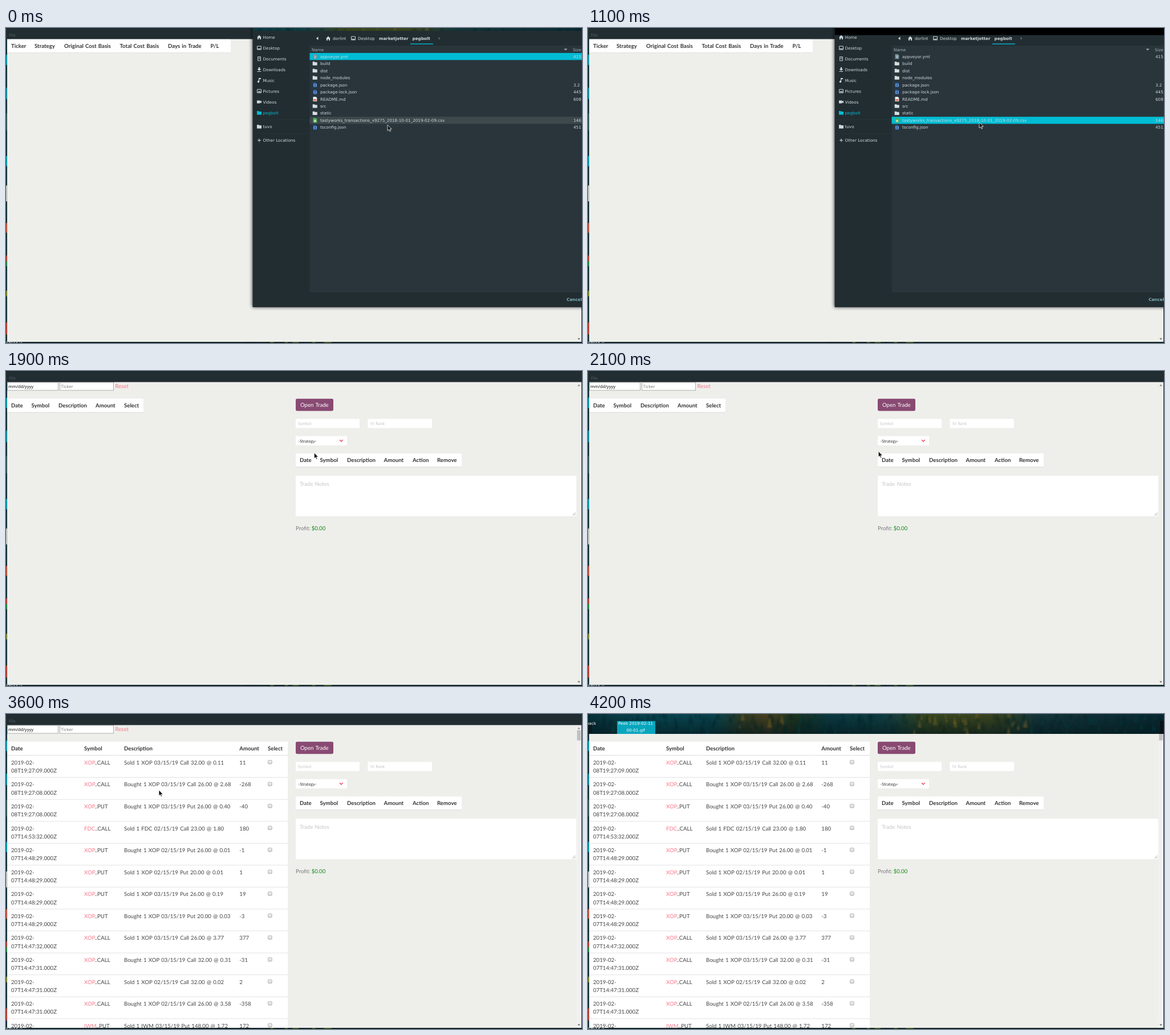
An HTML page for the animation above (4.3 s loop, 1010 px wide and 554 px high).

```html
<!DOCTYPE html>
<html lang="en">
<head>
<meta charset="utf-8">
<title>Trade import</title>
<style>
html, body { margin: 0; width: 100%; height: 100%; overflow: hidden; background: #eeefeb; }
svg { display: block; width: 1010px; height: 554px; }
text { white-space: pre; text-rendering: geometricPrecision; }
.web { font: 9.65px Lato, sans-serif; word-spacing: .75px; fill: #444; }
.head { font-weight: 700; fill: #333; }
.small { font-size: 7.3px; }
.field { font: 7.5px "Noto Sans", sans-serif; }
.ui { font: 7.2px "DejaVu Sans", sans-serif; fill: #cfd8dc; }
.bold { font-weight: 700; }
</style>
</head>
<body>
<svg id="stage" viewBox="0 0 1010 554" xmlns="http://www.w3.org/2000/svg"></svg>
<script>
const LOOP = 4300, STEP = 100;
const CYAN = '#00bcd4', PINK = '#f5798d', PALE = '#c4c6c8';

const rect = (x, y, w, h, fill, more = '') =>
  `<rect x="${x}" y="${y}" width="${w}" height="${h}" fill="${fill}" ${more}/>`;
const path = (d, fill, more = '') => `<path d="${d}" fill="${fill}" ${more}/>`;
const text = (x, y, s, cls, fill) =>
  `<text x="${x}" y="${y}" class="${cls}"${fill ? ` style="fill:${fill}"` : ''}>${s}</text>`;
const at = (x, y, body) => `<g transform="translate(${x} ${y})">${body}</g>`;
const group = (id, body) => `<g id="${id}">${body}</g>`;
const heads = (y, cols) => cols.map(([x, s]) => text(x, y, s, 'web head')).join('');

function seeded(seed) {
  return () => (seed = (seed * 16807) % 2147483647) / 2147483647;
}

const gradient = (id, axis, stops) => `<linearGradient id="${id}" ${axis}>${
  stops.map(([o, c]) => `<stop offset="${o}" stop-color="${c}"/>`).join('')}</linearGradient>`;
const down = 'x2="0" y2="1"';

const defs = `<defs>
  ${gradient('woods', '', [[0, '#08323b'], [.1, '#094652'], [.22, '#0a4650'], [.27, '#2f3a22'], [.31, '#4a4120'],
    [.36, '#1c341f'], [.42, '#0b3a42'], [.52, '#123f42'], [.59, '#37461f'], [.7, '#3b4520'], [.78, '#15363a'], [1, '#092a33']])}
  ${gradient('dusk', down, [[0, '#04181c00'], [1, '#04181caa']])}
  ${gradient('box', down, [[0, '#f2f2f2'], [1, '#d8d8d8']])}
  <filter id="shadow" x="-5%" y="-5%" width="110%" height="110%"><feGaussianBlur stdDeviation="3"/></filter>
  <filter id="soft"><feGaussianBlur stdDeviation="1"/></filter>
  <clipPath id="sky"><rect width="1010" height="35"/></clipPath>
  <clipPath id="sliver"><rect x="433" width="577" height="5"/></clipPath>
  <clipPath id="view"><rect x="2" y="19" width="1007" height="533"/></clipPath>
</defs>`;

function woods() {
  const rnd = seeded(77);
  let trees = '';
  for (let i = 0; i < 320; i++) {
    const x = rnd() * 1010, y = rnd() * 38, r = 2 + rnd() * 5;
    const warm = (x > 265 && x < 345) || (x > 560 && x < 770);
    const tones = warm ? ['#14261a', '#0d2320', '#7a6426'] : ['#062127', '#0c3c40', '#08292f'];
    trees += path(`M${x} ${y - r * 1.5}l${r * .6} ${r * 2.6}h${-r * 1.2}z`, tones[i % 3], 'opacity=".45"');
  }
  return `<g clip-path="url(#sky)">${rect(0, 0, 1010, 35, 'url(#woods)')}${rect(0, 0, 1010, 35, 'url(#dusk)')}` +
    `<g filter="url(#soft)">${trees}</g></g>`;
}

// Slivers of the desktop that show around the window.
function edges() {
  const side = [[47, 18, '#08a6bd'], [105, 20, '#0a94ab'], [150, 30, '#31585a'], [225, 18, '#08a6bd'],
    [277, 28, '#d5d5d0'], [343, 17, '#d8553a'], [400, 10, '#c8402f'], [410, 9, '#1f8a4c'],
    [462, 10, '#7c8a2c'], [518, 21, '#d23c30']];
  const rnd = seeded(5);
  let s = rect(0, 0, 2, 554, '#0e2c33') + rect(0, 552, 1010, 2, '#0d2325') + rect(1009, 0, 1, 554, '#14272c');
  s += side.map(([y, h, c]) => rect(0, y, 1.7, h, c)).join('');
  for (let i = 0; i < 16; i++) s += rect(420 + rnd() * 150, 552, 3 + rnd() * 9, 2, i % 2 ? '#34511f' : '#0a1c20');
  return s + text(0, 555, 'ywork.g', 'ui');
}

const scrollArrows = path('M1002 26.5l2.5-3 2.5 3z', '#8d8d8d') + path('M1002 545.5l2.5 3 2.5-3z', '#777');
const titleBar = rect(0, 0, 1010, 19.5, '#222d32') + rect(0, 0, 1010, 1, '#10272d') +
  text(5, 14.6, 'File', 'ui', '#4f5b60');

const emptyList = rect(2, 19.5, 392, 23.5, '#fff') + rect(2, 43, 392, 1, '#e1e1e1') +
  heads(34.6, [[9, 'Ticker'], [50, 'Strategy'], [102, 'Original Cost Basis'],
    [199.5, 'Total Cost Basis'], [284, 'Days in Trade'], [358.5, 'P/L']]);

function tradeForm() {
  const border = 'stroke="#9b9b9b" stroke-width=".8"';
  return rect(2.4, 20, 89.2, 14, '#fff', border) + text(4, 30, 'mm/dd/yyyy', 'field', '#111') +
    rect(94.4, 20, 94.2, 14, '#fff', border) + text(96.5, 30, 'Ticker', 'field', '#7a7a7a') +
    text(191.5, 30.2, 'Reset', 'web', PINK) +
    rect(508, 48.7, 66, 21.5, '#884a72', 'rx="2.4"') + text(516, 62.6, 'Open Trade', 'web', '#fff') +
    rect(508, 84.3, 112, 16, '#fff', 'rx="1"') + text(512, 95.1, 'Symbol', 'web small', PALE) +
    rect(634.5, 84.3, 112.3, 16, '#fff', 'rx="1"') + text(639, 95.1, 'IV Rank', 'web small', PALE) +
    rect(508, 114.6, 90, 16.2, '#fff', 'rx="1"') + text(512.5, 125.5, '-Strategy-', 'web small', '#333') +
    path('M585 121l2.9 2.9 2.9-2.9', 'none', 'stroke="#ee4f6c" stroke-width="1.5"') +
    rect(508, 145, 291, 23.5, '#fff') + rect(508, 168.3, 291, 1, '#dedede') +
    heads(160, [[515, 'Date'], [550.5, 'Symbol'], [598, 'Description'], [662.5, 'Amount'], [713, 'Action'], [756, 'Remove']]) +
    rect(508, 184, 492, 71.3, '#fff', 'rx="1"') + text(515, 201.8, 'Trade Notes', 'web', PALE) +
    path('M993.5 254l5-5M996.5 254l2-2', 'none', 'stroke="#777" stroke-width=".7"') +
    text(508, 280, 'Profit:', 'web', '#777') + text(535.7, 280, '$0.00', 'web', '#128a12');
}

const noTrades = rect(2, 48.5, 239, 24, '#fff') + rect(2, 72.3, 239, 1, '#dedede') +
  heads(64, [[9, 'Date'], [44.5, 'Symbol'], [92, 'Description'], [157, 'Amount'], [207, 'Select']]);

const TRADES = [
  '08T19:27:09 XOP Call Sold 03/15/19 32.00 0.11',
  '08T19:27:08 XOP Call Bought 03/15/19 26.00 2.68',
  '08T19:27:08 XOP Put Bought 03/15/19 26.00 0.40',
  '07T14:53:32 FDC Call Sold 02/15/19 23.00 1.80',
  '07T14:48:29 XOP Put Bought 02/15/19 26.00 0.01',
  '07T14:48:29 XOP Put Sold 02/15/19 20.00 0.01',
  '07T14:48:29 XOP Put Sold 03/15/19 26.00 0.19',
  '07T14:48:29 XOP Put Bought 03/15/19 20.00 0.03',
  '07T14:47:32 XOP Call Sold 03/15/19 26.00 3.77',
  '07T14:47:31 XOP Call Bought 03/15/19 32.00 0.31',
  '07T14:47:31 XOP Call Sold 02/15/19 32.00 0.02',
  '07T14:47:31 XOP Call Bought 02/15/19 26.00 3.58',
  '07T14:45:10 IWM Put Sold 03/15/19 148.00 1.72'
];

function tradeRow(line, i) {
  const [time, symbol, kind, side, expiry, strike, price] = line.split(' ');
  const amount = Math.round(price * 100) * (side === 'Sold' ? 1 : -1);
  const y = 88.8 + i * 38.57;
  return text(9, y, '2019-02-', 'web') + text(9, y + 14.4, `${time}.000Z`, 'web') +
    text(137, y, `<tspan fill="${PINK}">${symbol}</tspan>..${kind.toUpperCase()}`, 'web') +
    text(207, y, `${side} 1 ${symbol} ${expiry} ${kind} ${strike} @ ${price}`, 'web') +
    text(409.3, y, amount, 'web') +
    rect(459.6, y - 7.4, 6.6, 6.4, 'url(#box)', 'rx="1.3" stroke="#a3a3a3" stroke-width=".8"') +
    rect(2, y + 22.4, 492, .8, '#dcdcdc');
}

const trades = rect(2, 48.5, 492, 504, '#fff') + rect(2, 72.3, 492, .9, '#d8d8d8') +
  heads(64, [[9, 'Date'], [137, 'Symbol'], [207, 'Description'], [409.3, 'Amount'], [459, 'Select']]) +
  TRADES.map(tradeRow).join('') +
  rect(1000.5, 19, 8.5, 533, '#f1f1f1') + rect(1001.3, 28.5, 6.7, 18, '#c1c1c1') + scrollArrows;

const line = 'fill="none" stroke="currentColor"';
const ICON = {
  home: '<path d="M0 4.5L4 .5l4 4H7V8H5V5.5H3V8H1V4.5z"/>',
  desk: `<path d="M.6 1h6.8v6H.6z" ${line}/><path d="M1.5 5h5v1.4h-5z"/>`,
  page: `<path d="M1.5.5h5v7h-5zM2.8 2.6h2.6M2.8 4.2h2.6" ${line} stroke-width=".9"/>`,
  down: '<path d="M2.8 0h2.4v3H7.4L4 6.2.6 3h2.2zM.6 7h6.8v1H.6z"/>',
  note: '<path d="M3 0h4v2H4.2v4.4a1.7 1.7 0 1 1-1.2-1.6z"/>',
  photo: `<path d="M.6 1h6.8v6H.6z" ${line}/><path d="M1.4 6l2-2.6L4.7 5l.8-1L7 6z"/>`,
  film: '<path d="M0 1.6h5.5v1.7L8 1.8v4.4L5.5 4.7v1.7H0z"/>',
  folder: '<path d="M0 1h3.2l1 1H8v5.4H0z"/>',
  plus: '<path d="M3.5 1h1v2.5H7v1H4.5V7h-1V4.5H1v-1h2.5z"/>'
};
const icon = (name, x, y, color) => at(x, y, `<g fill="${color}" color="${color}">${ICON[name]}</g>`);

const PLACES = [['home', 'Home', 16], ['desk', 'Desktop', 35], ['page', 'Documents', 54], ['down', 'Downloads', 73],
  ['note', 'Music', 92], ['photo', 'Pictures', 111], ['film', 'Videos', 130], ['folder', 'pegbolt', 149],
  ['folder', 'tuvo', 173.3], ['plus', 'Other Locations', 197.5]];

const FILES = ['appveyor.yml|415', 'build|', 'dist|', 'node_modules|', 'package.json|3.2', 'package-lock.json|445',
  'README.md|608', 'src|', 'static|', 'tastyworks_transactions_x9275_2018-10-01_2019-02-09.csv|146', 'tsconfig.json|451'];
const CSV = 9;
const rowY = i => 50.1 + i * 12.47;

function fileIcon(name, y) {
  const sheet = (color, mark) => at(538.5, y - 4, path('M0 0h4.8l2 2v6.2H0z', color) + mark);
  const ext = name.split('.')[1];
  if (ext === 'json') return sheet('#1d57a5', path('M2.6 2q-1 0-.8 1.2T1 4.6q1 .2.8 1.3t.8 1.2M4.4 2q1 0 .8 1.2T6 4.6q-1 .2-.8 1.3t-.8 1.2', 'none', 'stroke="#fff" stroke-width=".7"'));
  if (ext === 'md') return sheet('#eceff1', rect(1, 4.4, 4.8, 2.6, '#d9623f'));
  if (ext === 'csv') return sheet('#4caf50', rect(1.4, 3.4, 4, 3.4, '#d8f0d4') + rect(1.4, 4.8, 4, .6, '#4caf50'));
  if (ext === 'yml') return sheet('#78909c', path('M2 3.2h3M2 4.8h3M2 6.4h3', 'none', 'stroke="#dfe7ea" stroke-width=".7"'));
  return icon('folder', 537.7, y - 4.2, '#d7dee0');
}

function dialog() {
  const places = PLACES.map(([kind, label, y]) => {
    const color = label === 'pegbolt' ? CYAN : '#cfd8dc';
    return icon(kind, 440, y - 4, color) + text(450.5, y + 2.6, label, 'ui', color);
  }).join('');
  const files = FILES.map((entry, i) => {
    const [name, size] = entry.split('|'), y = rowY(i);
    return fileIcon(name, y) + text(551, y + 2.6, name, 'ui') + text(995, y + 2.6, size, 'ui');
  }).join('');
  return rect(432, -10, 600, 501, '#000', 'opacity=".75" filter="url(#shadow)"') +
    rect(432.5, 0, 577.5, 491, '#222d32') + rect(532.5, 31, 477.5, 434, '#29353b') +
    rect(433, 161, 99, .6, '#2c383d') + rect(433, 185.4, 99, .6, '#2c383d') + places +
    path('M547.5 15.2v6l-3.6-3z', '#cfd8dc') + path('M758.5 15.4v5.6l3.2-2.8z', '#56636a') +
    icon('home', 561, 14, '#cfd8dc') + text(573, 20.8, 'dorlint', 'ui') +
    icon('desk', 605, 14, '#cfd8dc') + text(617, 20.8, 'Desktop', 'ui') +
    text(654, 20.8, 'marketjotter', 'ui bold') + text(712.5, 20.8, 'pegbolt', 'ui bold') +
    rect(709, 27.3, 40, 1.4, CYAN) +
    text(536, 40.6, 'Name', 'ui', '#a3b0b5') + path('M978.3 36.6h6l-3 3z', '#a3b0b5') + text(994, 40.6, 'Size', 'ui', '#a3b0b5') +
    rect(532.5, rowY(CSV) - 6.2, 477.5, 12.4, '#3d494c', 'id="hover"') +
    rect(532.5, 0, 477.5, 12.4, CYAN, 'id="selected"') + files +
    text(983, 480.4, 'Cancel', 'ui bold', '#7fb6b8') +
    group('sliver-top', `<g clip-path="url(#sliver)">${woods()}</g>`) +
    rect(433, 0, 577, 12.5, '#000', 'id="blackout"');
}

const desktopTop = woods() + rect(0, 18, 7, 17, '#081a1e') + rect(1003, 12, 6, 23, '#081216') +
  text(-3, 18.6, 'hack', 'ui', '#fff') + rect(51, 12.5, 67, 22.5, '#08a6bd') +
  text(53, 19.2, 'Peek 2019-02-11', 'ui', '#fff') + text(67.5, 30.6, '00-01.gif', 'ui', '#fff');

const stage = document.getElementById('stage');
stage.innerHTML = defs + rect(0, 0, 1010, 554, '#eeefeb') + edges() +
  `<g clip-path="url(#view)">${scrollArrows}${group('empty', emptyList)}${group('form', tradeForm())}` +
  `${group('none', noTrades)}${group('trades', trades)}</g>` +
  titleBar + group('dialog', dialog()) + group('desktop', desktopTop) +
  group('cursor', path('M0 0V10.2L2.4 8.1 4 11.7 5.6 11 4.1 7.5H7.3z', '#111', 'stroke="#fff" stroke-width=".75"'));

const part = id => document.getElementById(id);
const show = (id, on) => part(id).setAttribute('visibility', on ? 'inherit' : 'hidden');

// Pointer stops: time, x, y.
const POINTER = [[0, 669, 170.3], [100, 669, 170.3], [500, 686, 165.7], [1300, 686, 165.7], [1900, 540.3, 143.7],
  [2500, 447, 136.3], [2700, 447, 136.3], [2800, 397.5, 136.3], [2900, 397.5, 136.3], [3000, 335, 156], [3100, 335, 156],
  [3200, 319, 158.5], [3300, 306.5, 152.5], [3400, 306.5, 152.5], [3600, 268, 133.7], [4000, 236, -16], [LOOP, 236, -16]];

function pointerAt(t) {
  const i = POINTER.findIndex(p => p[0] > t);
  const [t0, x0, y0] = POINTER[i - 1], [t1, x1, y1] = POINTER[i];
  const k = (t - t0) / (t1 - t0);
  return [x0 + (x1 - x0) * k, y0 + (y1 - y0) * k];
}

function draw(now) {
  const t = Math.floor((now % LOOP) / STEP) * STEP;
  const chosen = t >= 800;
  show('dialog', t < 1200);
  show('sliver-top', t < 300);
  show('blackout', t >= 1000 && t < 1200);
  show('hover', !chosen);
  part('selected').setAttribute('y', rowY(chosen ? CSV : 0) - 6.2);
  show('empty', t < 1500);
  show('form', t >= 1500);
  show('none', t >= 1500 && t < 2200);
  show('trades', t >= 2200);
  show('desktop', t >= 4200);
  part('cursor').setAttribute('transform', `translate(${pointerAt(t)})`);
}

function tick() {
  draw(performance.now());
  requestAnimationFrame(tick);
}
tick();
</script>
</body>
</html>
```
